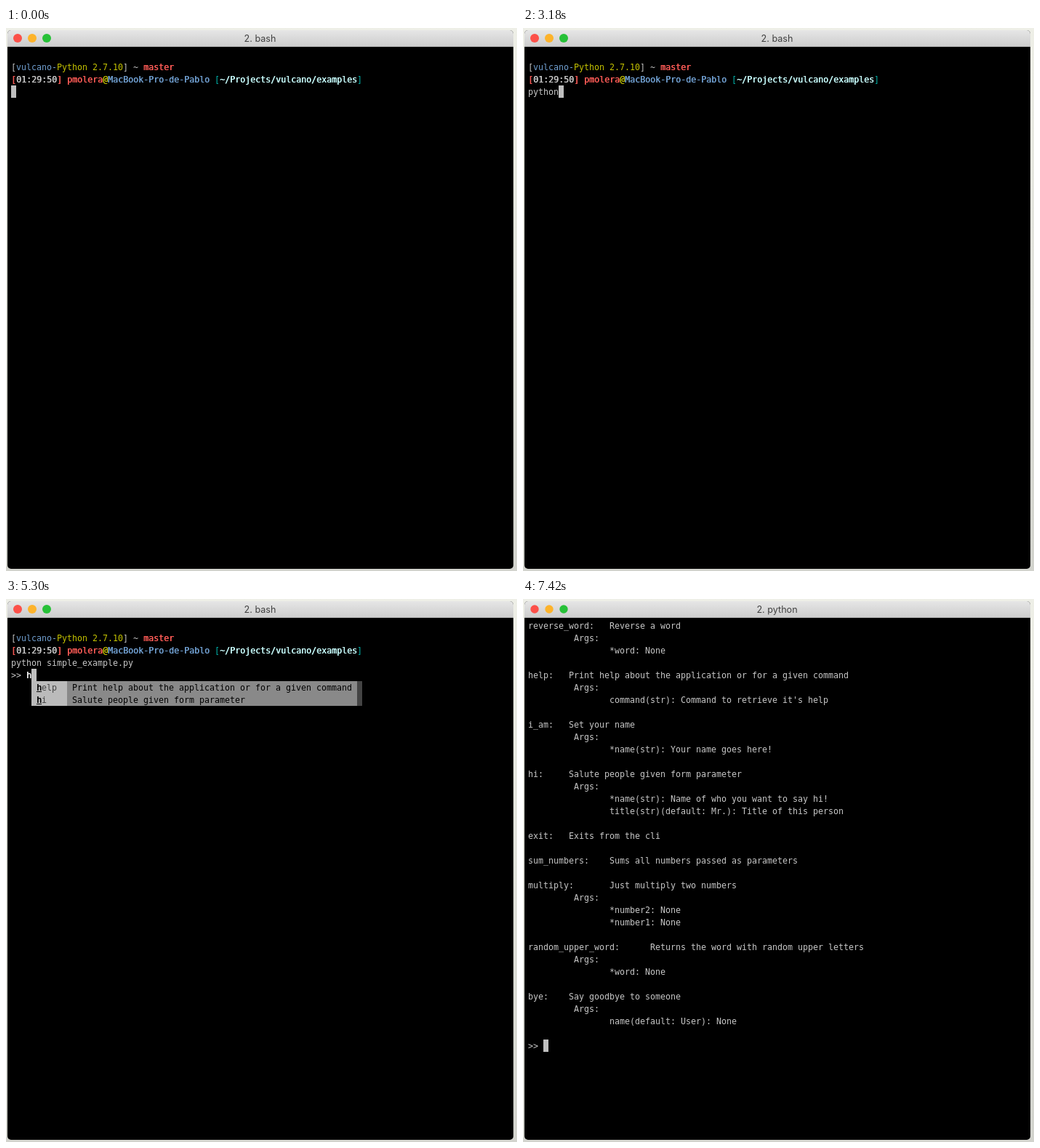
An HTML page with a canvas for the animation above (8 s loop, 703x747 px).

```html
<!DOCTYPE html>
<html lang="en">
<head>
<meta charset="utf-8">
<title>Terminal</title>
<style>
  html, body { margin: 0; width: 100%; height: 100%; overflow: hidden; background: #e2e3dc; }
  canvas { display: block; width: 703px; height: 747px; }
</style>
</head>
<body>
<canvas id="stage"></canvas>
<script>
const W = 703, H = 747, LOOP = 8000;
const CELL = 7, ROW = 17, LEFT = 7, TOP = 28;
const MONO = '11.63px "DejaVu Sans Mono", monospace';
const GREY = '#c7c7c7', RED = '#ff5c57', BLUE = '#709fd0', YELLOW = '#c4c200',
      CYAN = '#00b5ad', PALE = '#c9ffff', WHITE = '#ffffff';

const canvas = document.getElementById('stage');
const ctx = canvas.getContext('2d');
const ratio = window.devicePixelRatio || 1;
canvas.width = W * ratio;
canvas.height = H * ratio;

// Typed text on the command line; the cursor follows it.
const SHELL = [
  [0, ''], [1070, 'p'], [1420, 'pyth'], [1770, 'python'],
  [3530, 'python s'], [3880, 'python simple_example.py ']
];
const REPL = [[4590, ''], [5300, 'h'], [5650, 'hel']];
const HELP_AT = 6000, TITLE_AT = 5650, FADE_AT = 7420;

const PROMPT = [
  [['[', GREY], ['vulcano-', BLUE], ['Python 2.7.10', YELLOW], ['] ~ ', GREY], ['master', RED, 1]],
  [['[', RED, 1], ['01:29:50', GREY, 1], ['] ', RED, 1], ['pmolera', RED, 1], ['@', YELLOW, 1],
   ['MacBook-Pro-de-Pablo ', BLUE, 1], ['[', CYAN], ['~/Projects/vulcano/examples', PALE, 1], [']', CYAN]]
];

const ITEMS = [
  ['help', 'Print help about the application or for a given command'],
  ['hi', 'Salute people given form parameter']
];

const HELP = `reverse_word:\tReverse a word
\t Args:
\t\t*word: None

help:\tPrint help about the application or for a given command
\t Args:
\t\tcommand(str): Command to retrieve it's help

i_am:\tSet your name
\t Args:
\t\t*name(str): Your name goes here!

hi:\tSalute people given form parameter
\t Args:
\t\t*name(str): Name of who you want to say hi!
\t\ttitle(str)(default: Mr.): Title of this person

exit:\tExits from the cli

sum_numbers:\tSums all numbers passed as parameters

multiply:\tJust multiply two numbers
\t Args:
\t\t*number2: None
\t\t*number1: None

random_upper_word:\tReturns the word with random upper letters
\t Args:
\t\t*word: None

bye:\tSay goodbye to someone
\t Args:
\t\tname(default: User): None

>> `.split('\n').map(expandTabs);

function expandTabs(line) {
  let out = '';
  for (const ch of line) out += ch === '\t' ? ' '.repeat(8 - out.length % 8) : ch;
  return out;
}

const at = (steps, t) => steps.filter(s => s[0] <= t).pop()[1];
const cellX = col => LEFT + col * CELL;
const rowY = row => TOP + row * ROW;

function vertical(y0, y1, a, b) {
  const g = ctx.createLinearGradient(0, y0, 0, y1);
  g.addColorStop(0, a);
  g.addColorStop(1, b);
  return g;
}

function box(col, row, cols, color) {
  ctx.fillStyle = color;
  ctx.fillRect(cellX(col), rowY(row), cols * CELL, ROW);
}

const cursor = (col, row) => box(col, row, 1, '#bfbfbf');

// Bold is a double strike, as terminals do for fonts without a bold cut.
function put(text, col, row, color = GREY, bold = false) {
  ctx.font = MONO;
  ctx.textAlign = 'left';
  ctx.fillStyle = color;
  [...text].forEach((ch, i) => {
    if (ch === ' ') return;
    const x = cellX(col + i), y = rowY(row) + 13;
    ctx.fillText(ch, x, y);
    if (bold) ctx.fillText(ch, x + 0.5, y);
  });
}

function drawWindow(t) {
  ctx.fillStyle = vertical(0, H, '#eeefe7', '#d2d3cd');
  ctx.fillRect(0, 0, W, H);

  ctx.fillStyle = '#000';
  ctx.beginPath();
  ctx.roundRect(2, 3, 696, 741, 5);
  ctx.fill();

  ctx.fillStyle = vertical(3, 25, '#e6e6e6', '#cdcdcd');
  ctx.beginPath();
  ctx.roundRect(2, 3, 696, 22, [5, 5, 0, 0]);
  ctx.fill();
  ctx.fillStyle = '#b0b0b0';
  ctx.fillRect(2, 25, 696, 1);

  ['#fc5049', '#fdb32b', '#27c138'].forEach((color, i) => {
    ctx.fillStyle = color;
    ctx.beginPath();
    ctx.arc(16 + 20 * i, 14, t < FADE_AT ? 6 : 5.7, 0, 7);
    ctx.fill();
  });

  ctx.font = '12.6px Inter, sans-serif';
  ctx.textAlign = 'center';
  ctx.fillStyle = '#404040';
  ctx.fillText(t < TITLE_AT ? '2. bash' : '2. python', 349.5, 19);
}

function drawMenu(typed, col) {
  const items = ITEMS.filter(([name]) => name.startsWith(typed));
  items.forEach(([name, about], i) => {
    const row = 5 + i, n = typed.length;
    box(col, row, 7, '#bbbbbb');
    box(col + 7, row, 57, '#898989');
    box(col + 64, row, 1, '#444444');
    put(typed, col + 1, row, '#000', true);
    put(name.slice(n), col + 1 + n, row, '#444');
    ctx.fillStyle = '#000';
    ctx.fillRect(cellX(col + 1), rowY(row) + 14, n * CELL, 1);
    put(about, col + 8, row, '#000');
  });
}

function drawSession(t) {
  PROMPT.forEach((parts, i) => {
    let col = 0;
    for (const [text, color, bold] of parts) {
      put(text, col, i + 1, color, bold);
      col += text.length;
    }
  });

  const command = at(SHELL, t);
  put(command, 0, 3);
  if (t < REPL[0][0]) return cursor(command.length, 3);

  const typed = at(REPL, t), end = 3 + typed.length;
  put('>>', 0, 4);
  put(typed, 3, 4, WHITE, true);
  cursor(end, 4);
  if (typed) drawMenu(typed, end);
}

function drawHelp() {
  HELP.forEach((line, row) => put(line, 0, row));
  cursor(3, HELP.length - 1);
}

function frame(now) {
  const t = now % LOOP;
  ctx.setTransform(ratio, 0, 0, ratio, 0, 0);
  drawWindow(t);
  if (t < HELP_AT) drawSession(t);
  else drawHelp();
}

const start = performance.now();
function tick() {
  frame(performance.now() - start);
  requestAnimationFrame(tick);
}
tick();
</script>
</body>
</html>
```
